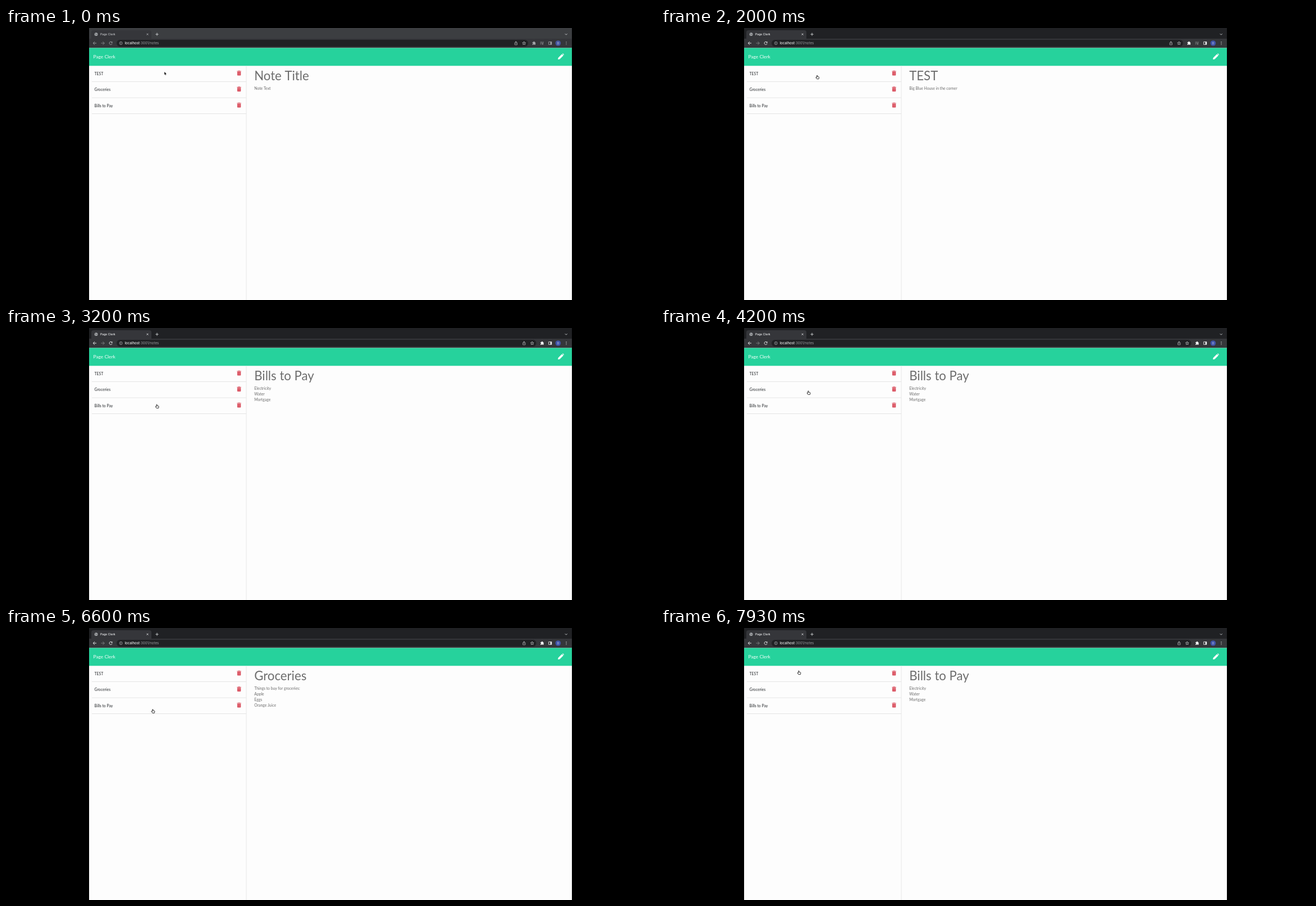
Recreate the animation shown at these times as an HTML page with a canvas. Size 1156x484 px, loop 8 s.

```html
<!DOCTYPE html>
<html lang="en">
<head>
<meta charset="utf-8">
<title>Page Clerk</title>
<style>
  html, body { margin: 0; width: 100%; height: 100%; overflow: hidden; background: #000; }
  canvas { display: block; }
</style>
</head>
<body>
<canvas id="stage" width="1156" height="484"></canvas>
<script>
const ctx = document.getElementById('stage').getContext('2d');
const LOOP = 8000, FPS = 15;
const APP = 'Page Clerk';
const LATO = 'Lato, sans-serif', UI = 'Inter, sans-serif';

const NOTES = {
  empty: ['Note Title', 'Note Text'],
  test: ['TEST', 'Big Blue House in the corner'],
  bills: ['Bills to Pay', 'Electricity', 'Water', 'Mortgage'],
  groceries: ['Groceries', 'Things to buy for groceries:', 'Apple', 'Eggs', 'Orange Juice']
};
const OPENED = [[0, 'empty'], [1060, 'test'], [3200, 'bills'], [4600, 'groceries'], [6860, 'bills']];

// Pointer tip: time, x, y
const PATH = [
  [0, 282.2, 78], [267, 278, 84], [2000, 278, 84], [2400, 271.6, 111], [2600, 271.2, 115],
  [2733, 270.5, 124.5], [3067, 268.5, 136], [3867, 268.5, 136], [4200, 262.3, 111.8],
  [5467, 262.3, 111.8], [5867, 261.3, 144.5], [7333, 261.3, 144.5], [7933, 245.3, 76]
];

function rect(x, y, w, h, color) {
  ctx.fillStyle = color;
  ctx.fillRect(x, y, w, h);
}

function round(x, y, w, h, r, color) {
  ctx.beginPath();
  ctx.roundRect(x, y, w, h, r);
  ctx.fillStyle = color;
  ctx.fill();
}

function text(s, x, y, size, color, family = LATO, weight = 400) {
  ctx.font = `${weight} ${size}px ${family}`;
  ctx.fillStyle = color;
  ctx.fillText(s, x, y);
  return x + ctx.measureText(s).width;
}

function icon(d, x, y, color, width = 0, fill = false) {
  const path = new Path2D(d);
  ctx.save();
  ctx.translate(x, y);
  if (fill) {
    ctx.fillStyle = color;
    ctx.fill(path);
  }
  if (width) {
    ctx.strokeStyle = color;
    ctx.lineWidth = width;
    ctx.stroke(path);
  }
  ctx.restore();
}

function dot(x, y, r, color) {
  ctx.beginPath();
  ctx.arc(x, y, r, 0, Math.PI * 2);
  ctx.fillStyle = color;
  ctx.fill();
}

function ring(x, y, r, color) {
  ctx.beginPath();
  ctx.arc(x, y, r, 0, Math.PI * 2);
  ctx.strokeStyle = color;
  ctx.lineWidth = 0.7;
  ctx.stroke();
}

function drawBrowser(active, compact) {
  const bright = active ? '#f1f2f3' : '#a2a4a7';
  const dim = active ? '#85878a' : '#8b8d90';
  const shift = compact ? 14.5 : 0;

  rect(148, 0, 860, 20, active ? '#202124' : '#3c3e41');
  round(152, 4, 107, 18, [4, 4, 0, 0], '#35363a');
  rect(148, 19, 860, 17, '#35363a');

  dot(160.5, 11.2, 2.9, '#a5a8ab');
  icon('M-2 -.9Q-.5 -1.8 0 -.3T2 .2M-1.4 1.6L0 .6', 160.5, 11.2, '#4b4d50', 0.8);
  text(APP, 168, 13, 5.1, active ? '#f1f2f3' : '#c4c6c9', UI, 500);
  icon('M-1.5 -1.5L1.5 1.5M1.5 -1.5L-1.5 1.5', 252, 11.2, active ? '#e4e5e7' : '#b5b7ba', 0.8);
  icon('M-2.6 0H2.6M0 -2.6V2.6', 269, 11.2, '#d2d4d6', 0.9);
  icon('M-2 -1L0 1L2 -1', 997.7, 11.2, '#d2d4d6', 0.9);

  icon('M3 0H-2.7M0 -2.8L-2.8 0L0 2.8', 158, 27, bright, 0.9);
  icon('M-3 0H2.7M0 -2.8L2.8 0L0 2.8', 172.5, 27, dim, 0.9);
  icon('M2.2 -1.5A2.6 2.6 0 1 0 2.5 .8', 186.6, 27, bright, 0.9);
  icon('M2.9 -3.1V-.4H.2Z', 186.6, 27, bright, 0, true);

  round(197, 21, 733 + shift, 12, 6, '#202124');
  ring(204.7, 27, 2.6, '#b0b2b5');
  rect(204.3, 26.5, 0.8, 2, '#b0b2b5');
  rect(204.3, 25.2, 0.8, 0.8, '#b0b2b5');
  const end = text('localhost', 211.5, 29.2, 6.15, '#eceded', UI, 500);
  text(':3001/notes', end, 29.2, 6.15, '#9b9da1', UI);

  icon('M-1 -1H-2.1V2.9H2.1V-1H1M0 1V-3M-1.4 -1.8L0 -3.2L1.4 -1.8', 908.3 + shift, 27, '#c6c8ca', 0.7);
  icon('M0 -2.9L.8 -.9L2.9 -.8L1.3 .6L1.8 2.7L0 1.5L-1.8 2.7L-1.3 .6L-2.9 -.8L-.8 -.9Z',
    922.7 + shift, 27, '#d2d4d6', 0.7);
  icon('M-2.8 -1.9H-1V-2.3A.9 .9 0 0 1 .9 -2.3V-1.9H2.3V-.2A1 1 0 0 1 2.3 1.6V3H.7A.9 .9 0 0 0 -1.1 3H-2.8V1.3A.9 .9 0 0 0 -2.8 -.5Z',
    940.5 + shift, 27, bright, 0, true);
  if (!compact) {
    icon('M-3 -2H1M-3 -.2H1M-3 1.6H-.6M2 1.6V-2H3.4', 954.5, 27, dim, 0.8);
    dot(955.9, 28.6, 1.1, dim);
  }
  icon('M-2.6 -2.4H2.6V2.4H-2.6Z', 969.2, 27, bright, 0.8);
  rect(969.6, 24.6, 2.3, 4.8, bright);
  dot(983.4, 27, 4.8, active ? '#4053a8' : '#46569f');
  ctx.textAlign = 'center';
  text('D', 983.4, 28.8, 4.8, '#d9def2', UI);
  ctx.textAlign = 'left';
  for (const y of [24.7, 27, 29.3]) dot(998, y, 0.65, active ? '#d5d7d9' : '#a2a4a7');
}

function drawTrash(x, y) {
  const red = '#d94c5b';
  round(x - 1.3, y - 4.4, 2.6, 1.2, 0.4, red);
  rect(x - 3.6, y - 3.8, 7.2, 1.1, red);
  round(x - 3.2, y - 2.2, 6.4, 6.5, [0, 0, 0.9, 0.9], red);
  for (const dx of [-1.6, 0, 1.6]) rect(x + dx - 0.2, y - 1.3, 0.4, 4.6, '#e99aa3');
}

function drawPage(note, caret) {
  rect(148, 35.5, 860, 449, '#fdfdfd');
  rect(148, 35.5, 860, 31.8, '#26d29c');
  text(APP, 155.4, 54.1, 8.45, '#f8fffc');
  icon('M-5.3 5.3L-4.8 2.1L1.7 -4.4L4.4 -1.7L-2.1 4.8ZM2.4 -5L3.1 -5.3Q3.8 -5.6 4.4 -5L5 -4.4Q5.6 -3.8 5.3 -3.1L5 -2.4Z',
    988.4, 50.8, '#ffffff', 0, true);

  ['TEST', 'Groceries', 'Bills to Pay'].forEach((name, i) => {
    const y = 81.2 + i * 28.45;
    text(name, 157.6, y + 2.5, 6.8, '#26292c');
    drawTrash(415.1, y - 1);
    rect(153, y + 14, 275, 0.8, '#dfdfdf');
  });
  rect(427.6, 67.3, 0.9, 417, '#e6e6e6');

  const [title, ...lines] = NOTES[note];
  text(title, 442.2, 92.5, 22.2, '#6e6e6e');
  lines.forEach((line, i) => text(line, 442.3, 109.7 + i * 10.13, 6.8, '#6b6b6b'));
  if (caret) rect(442.3, 103.2, 0.8, 8, '#222222');
}

function pointerAt(t) {
  let i = 1;
  while (i < PATH.length - 1 && t > PATH[i][0]) i++;
  const [t0, x0, y0] = PATH[i - 1], [t1, x1, y1] = PATH[i];
  const k = Math.min(1, (t - t0) / (t1 - t0));
  return [x0 + (x1 - x0) * k, y0 + (y1 - y0) * k];
}

function drawPointer(t) {
  const [x, y] = pointerAt(t);
  const hand = t >= 860;
  const shape = new Path2D(hand
    ? 'M-.5 .6Q0 -.3 .6 .6V2.5L2.6 2.9Q3.7 3.1 3.5 4.2L3 6.6H-.4L-2.2 4Q-2 3 -.9 3.8L-.5 4.1Z'
    : 'M0 0V5.2L1.2 4.1L2 6L2.9 5.6L2.1 3.8H3.7Z');
  ctx.save();
  ctx.translate(x, y);
  ctx.lineJoin = 'round';
  ctx.fillStyle = hand ? '#ffffff' : '#111111';
  ctx.strokeStyle = hand ? '#333333' : '#ffffff';
  ctx.lineWidth = hand ? 0.8 : 0.5;
  ctx.stroke(shape);
  ctx.fill(shape);
  if (hand) ctx.stroke(shape);
  ctx.restore();
}

function draw(ms) {
  const t = Math.floor((ms % LOOP + 7) * FPS / 1000) * 1000 / FPS;
  const note = OPENED.filter(([at]) => t >= at).pop()[1];
  rect(0, 0, 1156, 484, '#000000');
  drawBrowser(t >= 400, t >= 2400);
  drawPage(note, t >= 400 && t < 860);
  drawPointer(t);
}

const start = performance.now();
function tick() {
  draw(performance.now() - start);
  requestAnimationFrame(tick);
}
tick();
</script>
</body>
</html>
```
